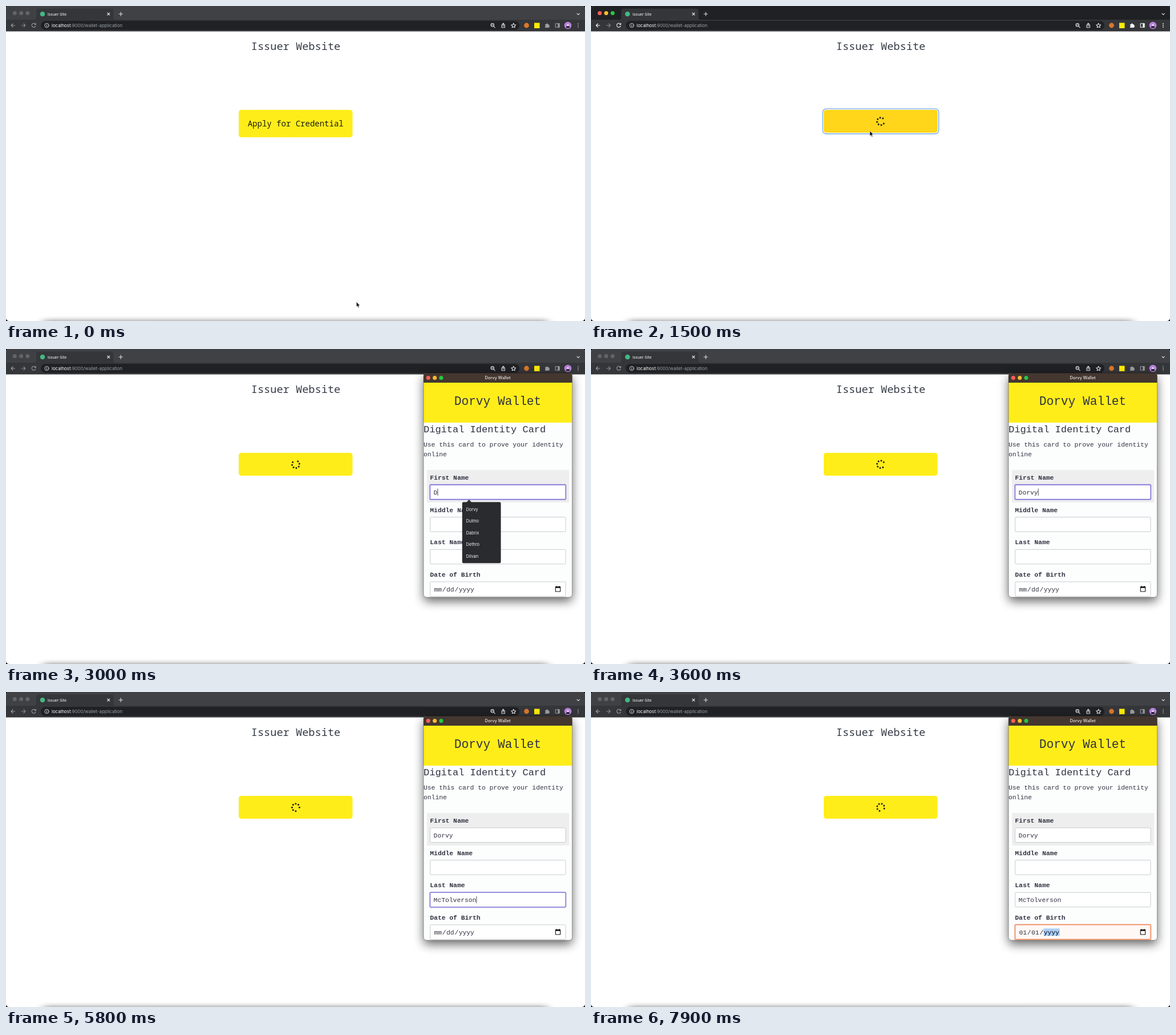
An HTML page that plays this animation: 1015x552 px, repeating every 8000 ms.

```html
<!DOCTYPE html>
<html lang="en">
<head>
<meta charset="utf-8">
<title>Issuer Site</title>
<style>
  html, body { margin: 0; width: 100%; height: 100%; overflow: hidden; background: #000; }
  svg { display: block; }
  text { white-space: pre; }
  .ui { font-family: Inter, "Open Sans", sans-serif; }
  .plex { font-family: "Noto Sans Mono", "DejaVu Sans Mono", monospace; }
  .courier { font-family: "Liberation Mono", "Courier New", monospace; fill: #303241; font-size: 11.33px; }
  .line { fill: none; stroke-width: 1.1; stroke-linecap: round; stroke-linejoin: round; }
</style>
</head>
<body>
<svg id="stage" width="1015" height="552" viewBox="0 0 1015 552">
  <defs>
    <clipPath id="screen"><rect width="1015" height="552" rx="5"/></clipPath>
    <clipPath id="walletShape"><rect x="732" y="42" width="260.5" height="393" rx="5"/></clipPath>
    <filter id="soft" x="-10%" y="-300%" width="120%" height="700%"><feGaussianBlur stdDeviation="8 4"/></filter>
    <filter id="drop" x="-30%" y="-30%" width="160%" height="160%"><feGaussianBlur stdDeviation="9"/></filter>
  </defs>
  <g clip-path="url(#screen)">
    <rect width="1015" height="552" fill="#fff"/>
    <rect x="66" y="551" width="883" height="20" fill="#000" opacity=".45" filter="url(#soft)"/>

    <rect id="strip" width="1015" height="26"/>
    <path d="M49 24Q53 24 53 20V9Q53 4.500 57.500 4.500H184Q188.500 4.500 188.500 9V20Q188.500 24 192.500 24Z" fill="#35363a"/>
    <rect y="24" width="1015" height="20.500" fill="#35363a"/>
    <rect x="61" y="26" width="839" height="16" rx="8" fill="#202124"/>
    <g id="lights"></g>
    <circle cx="64" cy="14" r="4.300" fill="#42b883"/>
    <text class="ui" x="73" y="16.600" font-size="6.600" font-weight="500" fill="#e3e5e8">Issuer Site</text>
    <g class="line" stroke="#dfe1e5">
      <path d="M177.700 12l4 4m0-4l-4 4M198 14h6.400m-3.200-3.200v6.400M1001 13.200l2.200 2.200 2.200-2.200"/>
      <circle cx="71.500" cy="34" r="3.600" stroke-width=".9"/>
      <path d="M71.500 33.800v2M71.500 32.200v.1" stroke-width=".9"/>
      <circle cx="852.700" cy="33.300" r="2.700"/><path d="M854.700 35.300l2.500 2.500M851.700 33.300h2"/>
      <path d="M870.200 33h-1.200v4.700h5.400V33h-1.200M871.700 35.500v-5.200m-1.600 1.500l1.600-1.600 1.600 1.600"/>
      <path d="M889.700 30.200l1.200 2.600 2.800.3-2.100 1.900.6 2.800-2.500-1.400-2.500 1.400.6-2.800-2.100-1.900 2.800-.3z"/>
    </g>
    <text class="ui" x="80" y="36.900" font-size="7.850" fill="#9aa0a6"><tspan fill="#fff">localhost</tspan>:9000/wallet-application</text>
    <path class="line" stroke="#85878a" d="M27.200 34h6.800m-3-3l3 3-3 3"/>
    <g id="navIcons">
      <path class="line" d="M15.500 34H9m3-3l-3 3 3 3M51.500 31.600A3.500 3.500 0 1 0 52 35M52.200 30.300v2.200h-2.200"/>
      <path class="solid" d="M945 32h2a1.400 1.400 0 1 1 2.800 0h2v2a1.400 1.400 0 1 1 0 2.800V38H945v-2a1.300 1.300 0 0 0 0-2.400z"/>
      <path class="line" d="M963.300 30.800h6.800v6.400h-6.800z"/><rect class="solid" x="967.300" y="30.500" width="3" height="7"/>
      <g class="solid"><circle cx="1003" cy="31" r=".9"/><circle cx="1003" cy="34" r=".9"/><circle cx="1003" cy="37" r=".9"/></g>
    </g>
    <circle cx="912.500" cy="34" r="4.400" fill="#d9772b"/>
    <rect x="926" y="29.500" width="9.500" height="9.500" fill="#fdec05"/>
    <circle cx="985" cy="34" r="6.300" fill="#b982dd"/>
    <path d="M982 38.500v-1.500q0-2 3-2t3 2v1.500z" fill="#22202a"/><circle cx="985" cy="33.500" r="1.700" fill="#e9e4ee"/>

    <text class="plex" x="508" y="77" font-size="18.650" font-weight="300" text-anchor="middle" fill="#343a45">Issuer Website</text>
    <rect id="ring" x="406.200" y="180.200" width="203.400" height="43.800" rx="6" fill="#fff" stroke="#75a9ee" stroke-width="1.300"/>
    <rect id="button" x="408" y="182" width="199.500" rx="4.500"/>
    <text id="buttonText" class="plex" x="507.700" y="211.300" font-size="14" text-anchor="middle" fill="#1c1c10">Apply for Credential</text>
    <g id="spinner" fill="#1d1b10"></g>

    <g id="wallet">
      <rect x="732" y="49" width="260.500" height="393" rx="6" opacity=".6" filter="url(#drop)"/>
      <g clip-path="url(#walletShape)">
        <rect x="732" y="42" width="261" height="393" fill="#fcfdfd"/>
        <rect x="732" y="42" width="261" height="17" fill="#43372f"/>
        <rect x="732" y="59" width="261" height="70" fill="#ffed1a"/>
        <circle cx="740.200" cy="50.400" r="3.500" fill="#ff5f57"/>
        <circle cx="751.600" cy="50.400" r="3.500" fill="#febc2e"/>
        <circle cx="762.900" cy="50.400" r="3.500" fill="#28c840"/>
        <text class="ui" x="862" y="53" font-size="7.300" font-weight="600" text-anchor="middle" fill="#d8d2ce">Dorvy Wallet</text>
        <text class="courier" x="862" y="97.700" text-anchor="middle" style="font-size:21.200px">Dorvy Wallet</text>
        <text class="courier" x="732" y="145.500" style="font-size:17px">Digital Identity Card</text>
        <text class="courier" x="732" y="171">Use this card to prove your identity</text>
        <text class="courier" x="732" y="187.800">online</text>
        <rect x="738" y="212" width="249" height="57" fill="#eee"/>
        <g id="form"></g>
      </g>
      <rect x="732" y="42" width="260.500" height="393" rx="5" fill="none" stroke="#000" stroke-opacity=".45" stroke-width=".7"/>
      <g id="suggestions"></g>
    </g>

    <path id="arrow" d="M0 0V8.800L2 7 3.400 10.200 4.900 9.500 3.500 6.500H6.200Z" fill="#000" stroke="#fff" stroke-width=".6"/>
    <path id="beam" class="line" stroke="#222" stroke-width=".9" d="M-1.800-4Q0-4 0-3Q0-4 1.800-4M0-3V3M-1.800 4Q0 4 0 3Q0 4 1.800 4M-.8.9H.8"/>
  </g>
</svg>
<script>
const LOOP = 8000, STEP = 100;
const $ = id => document.getElementById(id);
const set = (node, attrs) => { for (const k in attrs) node.setAttribute(k, attrs[k]); };
const show = (node, on) => set(node, { visibility: on ? "visible" : "hidden" });

function add(parent, tag, attrs = {}, text) {
  const node = document.createElementNS("http://www.w3.org/2000/svg", tag);
  set(node, attrs);
  if (text !== undefined) node.textContent = text;
  return parent.appendChild(node);
}

// Event times in ms
const T = {
  active: 900, loading: 1100, wallet: 1700,
  first: 2500, middle: 3800, last: 4200, date: 6200, dateTyped: 6900
};
const FIRST = "Dorvy", LAST = "McTolverson";
const FIRST_HINTS = [FIRST, "Dulmo", "Dabrix", "Dethro", "Dilvan"];
const LAST_HINTS = [LAST, "McTobber"];
const PATH = [[0, 614.3, 518.5], [100, 592, 455], [200, 555, 361], [300, 555, 361],
  [800, 488.8, 219], [1500, 488.8, 219], [2200, 781.5, 245.5], [LOOP, 781.5, 245.5]];

const lights = ["#ff5f57", "#febc2e", "#28c840"].map((color, i) =>
  ({ color, node: add($("lights"), "circle", { cx: 15.3 + 11.3 * i, cy: 12.4, r: 3.5 }) }));

// Eight places on the ring, the upper right one empty
for (let i = 0; i < 8; i++) {
  const a = i * Math.PI / 4;
  if (i !== 7) add($("spinner"), "circle", { cx: 6.5 * Math.cos(a), cy: 6.5 * Math.sin(a), r: 1.5 });
}

const fields = ["First Name", "Middle Name", "Last Name", "Date of Birth"].map((label, i) => {
  const y = 238 + 56.65 * i, form = $("form");
  add(form, "text", { class: "courier", x: 743.3, y: y - 9, "font-weight": 700 }, label);
  return {
    y,
    halo: add(form, "rect", { x: 743, y: y - .5, width: 238.5, height: 26.5, rx: 2, fill: "none", "stroke-width": 2.2, opacity: .4 }),
    box: add(form, "rect", { x: 743.5, y, width: 237.5, height: 25.5, rx: 1.2 }),
    text: add(form, "text", { class: "courier", x: 749.6, y: y + 16.7 }),
    caret: add(form, "rect", { y: y + 6.5, width: .8, height: 12.5, fill: "#222" })
  };
});

const dateY = fields[3].y;
const mark = add($("form"), "rect", { y: dateY + 6.5, height: 12.8, fill: "#a9cffb" });
const dateParts = [750.5, 764.8, 772, 786.4, 793.7].map(x =>
  add($("form"), "text", { class: "courier", x, y: dateY + 16.7 }));
add($("form"), "path", { class: "line", stroke: "#111", d: `M963.300 ${dateY + 9}h8.400v8h-8.400z` });
add($("form"), "path", { fill: "#111", d: `M963 ${dateY + 8.3}h9v2.500h-9zM964.500 ${dateY + 7.3}h1.300v1.500h-1.300zM969.300 ${dateY + 7.3}h1.300v1.500h-1.300z` });

const typed = (word, t, start, pace) =>
  word.slice(0, Math.max(0, Math.floor((t - start) / pace) + 1));

function firstName(t) {
  if (t < 2800) return "";
  return t < 3100 ? FIRST[0] : typed(FIRST, t, 3000, 100);
}

function lastName(t) {
  return t < 4900 ? typed(LAST.slice(0, 2), t, 4600, 100) : typed(LAST, t, 4700, 100);
}

function cursorAt(t) {
  const i = PATH.findIndex(p => p[0] > t);
  const [t0, x0, y0] = PATH[i - 1], [t1, x1, y1] = PATH[i];
  const u = (t - t0) / (t1 - t0), e = u * u * (3 - 2 * u);
  return [x0 + (x1 - x0) * e, y0 + (y1 - y0) * e];
}

function drawBrowser(t) {
  const active = t >= T.active && t < T.wallet, loading = t >= T.loading;
  set($("strip"), { fill: active ? "#202124" : "#404145" });
  lights.forEach(l => set(l.node, { fill: active ? l.color : "#626467" }));
  const icon = active ? "#f1f3f4" : "#9b9da0";
  $("navIcons").querySelectorAll(".line").forEach(n => set(n, { stroke: icon }));
  $("navIcons").querySelectorAll(".solid").forEach(n => set(n, { fill: icon }));
  show($("ring"), active && loading);
  set($("button"), { fill: active ? "#ffd61a" : "#ffed1a", height: loading ? 40 : 48 });
  show($("buttonText"), !loading);
  show($("spinner"), loading);
  set($("spinner"), { transform: `translate(507.900 202.200) rotate(${(t - 1300) * .18})` });
}

function drawSuggestions(field, text, hints) {
  const box = $("suggestions");
  box.replaceChildren();
  const items = text && text !== hints[0] ? hints.filter(h => h.startsWith(text)) : [];
  if (!items.length) return;
  const top = field.y + 30.3;
  add(box, "path", { d: `M807 ${top + .5}l4.700-4.800 4.700 4.800z`, fill: "#292b2e" });
  add(box, "rect", { x: 799.7, y: top, width: 67.8, height: 20.5 * items.length + 4.5, rx: 2.5, fill: "#292b2e" });
  items.forEach((name, i) =>
    add(box, "text", { class: "ui", x: 806.5, y: top + 15.4 + 20.5 * i, "font-size": 7.4, fill: "#f0f1f2" }, name));
}

function drawDate(t) {
  const month = t >= T.dateTyped, day = t >= 7200;
  const parts = [month ? "01" : "mm", "/", day ? "01" : "dd", "/", "yyyy"];
  const chosen = t < T.date ? -1 : t < 7000 ? 0 : t < 7300 ? 2 : 4;
  dateParts.forEach((node, i) => {
    node.textContent = parts[i];
    node.style.fill = i === chosen ? "#0b0c14" : "";
  });
  show(mark, chosen >= 0);
  if (chosen >= 0) set(mark, { x: +dateParts[chosen].getAttribute("x") - .3, width: parts[chosen].length * 6.8 + 1 });
}

function drawWallet(t) {
  const open = t >= T.wallet;
  $("wallet").style.display = open ? "" : "none";
  if (!open) return;
  const focus = [T.first, T.middle, T.last, T.date].filter(s => t >= s).length - 1;
  const values = [firstName(t), "", lastName(t), ""];
  fields.forEach((f, i) => {
    const on = i === focus, invalid = i === 3 && t >= T.dateTyped;
    const color = invalid ? "#ee8152" : "#7d70d8";
    set(f.box, { stroke: on ? color : "#c3c7cb", "stroke-width": on ? 1.3 : .9, fill: invalid ? "#fff8f5" : "#fff" });
    set(f.halo, { stroke: color });
    show(f.halo, on);
    f.text.textContent = values[i];
    show(f.caret, on && i < 3);
    set(f.caret, { x: 749.7 + values[i].length * 6.8 });
  });
  drawDate(t);
  if (focus === 0) drawSuggestions(fields[0], values[0], FIRST_HINTS);
  else drawSuggestions(fields[2], focus === 2 ? values[2] : "", LAST_HINTS);
}

function drawCursor(t) {
  const [x, y] = cursorAt(t);
  const overField = t >= T.wallet && x > 744 && x < 981 && y > 238 && y < 264;
  const visible = t < 2800;
  show($("arrow"), visible && !overField);
  show($("beam"), visible && overField);
  const transform = `translate(${x} ${y})`;
  set($("arrow"), { transform });
  set($("beam"), { transform });
}

function draw(t) {
  drawBrowser(t);
  drawWallet(t);
  drawCursor(t);
}

const start = performance.now();
function tick() {
  const elapsed = (performance.now() - start) % LOOP;
  draw(Math.floor(elapsed / STEP) * STEP);
  requestAnimationFrame(tick);
}
tick();
</script>
</body>
</html>
```
